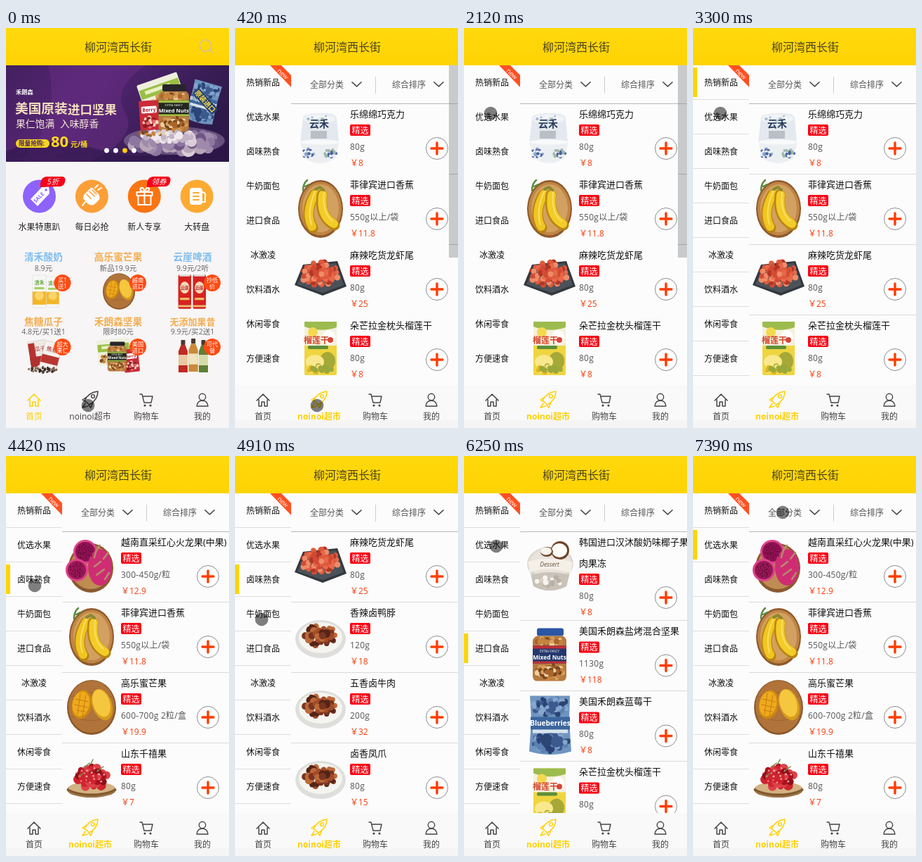
An HTML page that plays this animation: 318 px wide and 568 px high, repeating every 8 s.

```html
<!DOCTYPE html>
<html lang="zh-CN">
<head>
<meta charset="utf-8">
<title>Shop demo</title>
<style>
html, body { margin: 0; width: 100%; height: 100%; overflow: hidden; background: #fcfcfc; }
svg { display: block; width: 100vw; height: 100vh; }
text { font-family: "Open Sans", "Noto Sans CJK SC", "Noto Sans CJK", sans-serif; white-space: pre; }
</style>
</head>
<body>
<svg id="stage" viewBox="0 0 318 568" lang="zh-CN"></svg>
<script>
const LOOP = 8000;
const YELLOW = '#ffd507', RED = '#ff4a12', INK = '#222';
const BOLD = 'font-weight="700"';

// ---- drawing helpers (text is placed by its vertical centre) ----
const text = (x, y, s, size = 12, fill = INK, more = '') =>
  `<text x="${x}" y="${y + size * .38}" font-size="${size}" fill="${fill}" ${more}>${s}</text>`;
const mid = (x, y, s, size, fill, more = '') => text(x, y, s, size, fill, 'text-anchor="middle" ' + more);
const rect = (x, y, w, h, fill, r = 0, more = '') =>
  `<rect x="${x}" y="${y}" width="${w}" height="${h}" rx="${r}" fill="${fill}" ${more}/>`;
const oval = (x, y, rx, ry, fill, more = '') =>
  `<ellipse cx="${x}" cy="${y}" rx="${rx}" ry="${ry}" fill="${fill}" ${more}/>`;
const dot = (x, y, r, fill, more) => oval(x, y, r, r, fill, more);
const shape = (d, fill, more = '') => `<path d="${d}" fill="${fill}" ${more}/>`;
const line = (d, stroke, w = 1, more = '') =>
  `<path d="${d}" fill="none" stroke="${stroke}" stroke-width="${w}" stroke-linecap="round" stroke-linejoin="round" ${more}/>`;
const rule = (x1, x2, y, color) => rect(x1, y, x2 - x1, 1, color);
const at = (x, y, s, k = 1, turn = 0) =>
  `<g transform="translate(${x} ${y}) rotate(${turn}) scale(${k})">${s}</g>`;
const group = (id, s) => `<g id="${id}">${s}</g>`;

// evenly spread small pieces filling an ellipse, with some jitter
function heap(n, x, y, rx, ry, r, colors, seed = 7) {
  const rnd = () => (seed = seed * 16807 % 2147483647) / 2147483647;
  for (let i = 0; i < 3; i++) rnd();
  let s = '';
  for (let i = n - 1; i >= 0; i--) {
    const a = i * 2.4 + rnd() * .5, d = Math.sqrt((i + .5) / n);
    s += dot((x + Math.cos(a) * d * rx).toFixed(1), (y + Math.sin(a) * d * ry).toFixed(1),
      (r * (.75 + rnd() * .5)).toFixed(1), colors[Math.floor(rnd() * colors.length)]);
  }
  return s;
}
const nuts = ['#a9652c', '#ecd0a0', '#7c451d', '#d9a05c', '#c5843f'];
const berries = ['#3c5a8e', '#5c7fb2', '#2a4374', '#86a6cc'];
const plate = oval(38, 38, 32, 41, '#8f5a2b') + oval(38, 37.5, 30, 38, '#c08545') + oval(38, 37, 26, 34, '#d2a060');

// ---- product pictures, each in a 76 x 76 box ----
const bottle = (cap, body, label) => rect(32, -2, 15, 10, cap, 2) +
  shape('M32 8H47V18Q53 24 53 32V70Q53 75 48 75H31Q26 75 26 70V32Q26 24 32 18Z', body, 'stroke="#d5d9da" stroke-width=".7"') + label;
const tub = dome => shape('M-15 -6L-10 20Q0 26 10 20L15 -6Z', '#f1f1ee') +
  shape('M-15 -6Q-14 -25 0 -25T15 -6Z', dome) + oval(0, -6, 17, 4, '#dfe7e9') +
  heap(10, 0, -15, 9, 6, 2.4, ['#f0c48a', '#3f5874', '#fff', '#c9624a'], 5) +
  mid(0, 6, 'Yomia', 9, '#234466', BOLD + ' font-style="italic"') +
  heap(12, 0, 16, 8, 3, 1.8, ['#d35b41', '#6f86ab', '#e3b355'], 11);
const jar = (lid, label, stripe) => rect(20, -1, 38, 11, lid, 3) +
  shape('M20 10H57Q63 13 62 20V68Q61 74 56 74H20Q15 74 14 68V20Q13 13 20 10Z', '#b57a40') +
  heap(22, 38, 18, 20, 5, 3.2, nuts, 4) + heap(40, 38, 61, 20, 10, 3.4, nuts, 9) +
  rect(14, 24, 48, 25, label) + rect(14, 24, 48, 4, stripe) + rect(14, 46, 48, 3, stripe) +
  mid(38, 32, 'EXTRA FANCY', 4.5, '#fff') + mid(38, 40, 'Mixed Nuts', 8.4, '#fff', BOLD);
const darkJar = jar('#28252a', '#22271f', '#a3bd42');

const pics = {
  cup: shape('M13 9Q12 3 36 2T61 9L64 44H9Z', '#e3e9ef') + oval(36.5, 10, 23, 7, '#eef2f5') +
    heap(14, 36, 9, 20, 4, 2, ['#a9bbd2', '#bccab7', '#f5f7fa'], 4) + mid(36, 17, '云禾', 14, '#2a3d5e', BOLD) +
    rect(24, 27, 23, 11, '#b9bfc5') + shape('M9 42H65L59 66Q37 80 15 66Z', '#eceff2') + oval(37, 43, 28.5, 3.5, '#f8f9fa') +
    heap(16, 20, 59, 9, 6, 2.4, ['#46639e', '#8aa4cc', '#eceff2'], 3) + heap(16, 52, 59, 9, 6, 2.4, ['#46639e', '#9db7ab', '#eceff2'], 8),
  banana: plate + line('M13 12Q13 2 19 -3M16 6L22 3', '#5d8a3c', 2.5) +
    line('M29 18Q14 44 27 65', '#b98512', 15) + line('M30 17Q15 43 26 63', '#f0c521', 12) +
    line('M40 18Q36 50 58 61', '#b98512', 15) + line('M41 18Q37 48 57 59', '#f3cc28', 12) +
    line('M31 12Q18 40 25 60M43 14Q40 44 55 55', '#f9df63', 2) + line('M31 10L37 7L42 11', '#8a8a2a', 4),
  crayfish: shape('M1 46L13 17L62 12L75 48L41 61Z', '#33383f') + shape('M5 45L16 20L60 15L71 46L41 57Z', '#4b5259') +
    heap(58, 37, 30, 27, 17, 3.8, ['#d24a33', '#e8694a', '#b23524', '#f08b68', '#dd5a3d']),
  durian: rect(15, -2, 46, 76, '#efd53f', 2) + rect(15, -2, 46, 34, '#f4f1dc', 2) +
    shape('M15 -2H61V6Q38 14 15 5Z', '#9cbc4e') + oval(50, 20, 9, 10, '#fff') + dot(52, 24, 4, '#d84535') +
    dot(27, 13, 7, '#f5d850') + mid(32, 24, '榴莲干', 12, '#d5452a', BOLD) + rect(20, 32, 29, 5, '#5d8f3a', 2) +
    oval(48, 54, 11, 13, '#a6a838') + oval(30, 55, 13, 10, '#f9e98c') + heap(16, 36, 66, 19, 5, 3.4, ['#f7e078', '#e0b722', '#9aa83a'], 9),
  dragon: oval(37, 40, 32, 35, '#8a5a30') + oval(37, 39, 29, 31, '#bf8c52') +
    dot(29, 17, 17, '#dd4389') + dot(29, 17, 14, '#8f1152') + dot(17, 43, 16, '#dd4389') + dot(17, 43, 13, '#981656') +
    oval(50, 39, 17, 26, '#cf2d73') + line('M42 25Q44 14 50 8M55 27L62 18M45 50L56 42M42 38L51 31M57 56L63 47', '#b58a6e', 2.5) +
    heap(30, 29, 17, 11, 11, .7, ['#2b0b1e']) + heap(26, 17, 43, 10, 10, .7, ['#2b0b1e'], 5),
  mango: oval(38, 38, 35, 39, '#8d5829') + oval(38, 37, 33, 37, '#b0743a') + line('M8 50Q38 64 68 50M9 23Q38 10 67 23', '#9d6432', 1) +
    oval(24, 34, 14, 21, '#cc8714', 'transform="rotate(12 24 34)"') + oval(23, 33, 12, 18, '#efaa1c', 'transform="rotate(12 23 33)"') +
    line('M15 26L33 30M14 34L32 38M17 42L29 44M22 18L18 48M30 20L25 50', '#c87b10', 1) +
    oval(53, 34, 14, 23, '#d79b1d', 'transform="rotate(-18 53 34)"') + oval(52, 32, 12, 20, '#f5c73e', 'transform="rotate(-18 52 32)"'),
  tomato: oval(38, 55, 35, 11, '#9c7447') + oval(38, 52, 33, 8, '#d3b283') +
    heap(30, 38, 37, 23, 15, 5.6, ['#a9131f', '#cf2430', '#8f0e1b', '#dd4148'], 15) + heap(18, 37, 35, 22, 12, 1.3, ['#f2a3a3'], 4) +
    line('M28 23L35 17M37 18L40 12M46 29L55 22M20 36L27 31', '#6f8e45', 1.5) + line('M4 55Q38 70 72 55', '#80592f', 3),
  yogurt: at(25, 28, tub('#79bfe0')) + at(52, 52, tub('#61b8df'), 1, -14),
  carton: shape('M25 10L29 -1H52L57 10V71L53 75H28L24 71Z', '#eaf5fb') + rect(34, -5, 13, 8, '#46a5d7', 2) +
    rect(25, 10, 32, 31, '#3f91c5') + mid(41, 27, '晴牧', 14, '#fff', BOLD) +
    shape('M24 42H57V71L53 75H28L24 71Z', '#8ecce4') + shape('M24 52Q39 38 57 56V68Q38 46 24 64Z', '#f3fafc') + dot(49, 65, 4, '#4b9bc8'),
  matcha: bottle('#f2f2ee', '#f7f7f4', mid(39, 42, 'Verdi', 10, '#333', 'font-style="italic"') +
    dot(35, 60, 7, '#6f9440') + dot(44, 63, 5, '#a9c06e') + rect(27, 66, 25, 6, '#e8ecd9')),
  milk: bottle('#3e84b5', '#eef2f5', rect(27, 18, 25, 11, '#b3c8d6') + mid(39, 34, '1987', 11, '#25658f', BOLD) +
    mid(39, 48, '酸牛奶', 8, '#25658f') + rect(26, 56, 27, 14, '#71a7c8')),
  jelly: shape('M8 34L15 66Q38 78 62 66L70 34Z', '#d3cec6') + oval(39, 34, 33, 24, '#dcd7cf') + oval(39, 33, 30, 21, '#e8e3db') +
    dot(53, 15, 13, '#6d4429') + oval(52, 15, 11, 10, '#fffdf8') + oval(34, 17, 9, 7, '#6d4429') + oval(33, 16, 8, 5.5, '#f8f5ef') +
    shape('M7 31Q38 22 71 32L68 47Q38 37 10 46Z', '#f4f0e8') + mid(38, 35, 'Dessert', 8.5, '#665142', 'font-style="italic"') +
    shape('M12 50Q38 42 66 50L62 66Q38 78 15 66Z', '#c9c3ba') + heap(12, 38, 59, 20, 7, 3.2, ['#f7f4ee', '#d8d2c9', '#b9b0a4'], 4),
  jar: jar('#2b56a4', '#24386e', '#c12d35'),
  berry: shape('M10 -5H67L66 30L69 74Q39 83 9 74L12 30Z', '#6f95bf') + heap(40, 39, 10, 25, 13, 3.6, berries) +
    heap(48, 39, 61, 25, 14, 3.8, berries, 3) + rect(11, 25, 56, 18, '#3c669c') + rect(14, 43, 50, 5, '#d9e4ee') +
    mid(39, 33.5, 'Blueberries', 10, '#fff', BOLD) + dot(34, 58, 9, '#2b4577') + dot(48, 60, 8, '#3a5a8e'),
  meat: oval(38, 41, 36, 27, '#dedfdc') + oval(38, 39, 31, 22, '#f5f4ef') + heap(34, 38, 36, 23, 15, 4.6, ['#78351f', '#a34b29', '#552417', '#bd6939'], 21),
  fizz: rect(10, 0, 28, 74, '#d8221f', 4) + rect(12, 0, 24, 4, '#ddd', 2) + rect(10, 66, 28, 4, '#e5c475') +
    oval(24, 28, 10, 13, '#f2d9b5') + mid(24, 28, '云崖', 9, '#b81d22', BOLD) + rect(14, 50, 20, 5, '#e9be68'),
  box: rect(6, 2, 30, 72, '#f7f8f5', 1, 'stroke="#ddd"') + rect(6, 38, 30, 29, '#f4b629') + dot(21, 47, 10, '#fad56b') +
    mid(21, 18, '清禾', 11, '#65a440', BOLD) + rect(10, 28, 22, 5, '#a8cf63'),
  seeds: at(4, 8, rect(0, 0, 40, 60, '#efe9e3', 2, 'stroke="#ccc"') + rect(0, 4, 14, 52, '#b8322f') + rect(0, 34, 40, 20, '#b0302e') + mid(25, 18, '瓜子', 12, '#a62a2c'), 1, -9) +
    at(44, 4, rect(0, 0, 38, 60, '#f6f2ed', 2, 'stroke="#ccc"') + rect(0, 30, 38, 18, '#b93733') + mid(19, 16, '焦糖', 13, '#a62a2c'), 1, 14) +
    heap(34, 38, 68, 33, 6, 2.6, ['#2d2623', '#7e6150', '#4b3a31']),
};
const redPouch = rect(0, 0, 28, 42, '#cb2b38', 2) + rect(3, 8, 22, 10, '#fff', 2) + mid(14, 13, 'Berry', 7, '#b51f2e', BOLD) +
  heap(16, 14, 31, 11, 7, 2.6, ['#e76a72', '#f4d0bb', '#911923']);
const whitePouch = rect(0, 0, 58, 44, '#eef0dc', 2) + rect(1, 8, 56, 13, '#9abf45') + rect(8, 11, 36, 5, '#e9efc4') +
  heap(44, 30, 33, 26, 10, 3, nuts);
const smoothie = (c, label) => rect(3.5, 0, 6, 7, '#4a3a30', 1) + shape('M3.5 7H9.5L13 16V46H0V16Z', c) + rect(0, 21, 13, 15, label);

// ---- catalogue: title lines, spec, price, picture ----
const durian = ['朵芒拉金枕头榴莲干', '80g', '8', 'durian'];
const banana = ['菲律宾进口香蕉', '550g以上/袋', '11.8', 'banana'];
const lobster = ['麻辣吃货龙虾尾', '80g', '25', 'crayfish'];
const lists = {
  hot: [['乐绵绵巧克力', '80g', '8', 'cup'], banana, lobster, durian],
  fruit: [['越南直采红心火龙果(中果)', '300-450g/粒', '12.9', 'dragon'], banana,
    ['高乐蜜芒果', '600-700g 2粒/盒', '19.9', 'mango'], ['山东千禧果', '80g', '7', 'tomato']],
  deli: [lobster, ['香辣卤鸭脖', '120g', '18', 'meat'], ['五香卤牛肉', '200g', '32', 'meat'], ['卤香凤爪', '80g', '15', 'meat']],
  dairy: [['轻悦益生谷物组合风味发酵|乳', '120g', '8', 'yogurt'], ['岚湖晴牧酸奶', '80g', '8', 'carton'],
    ['净润清新抹茶酸奶', '80g', '8', 'matcha'], ['岚湖晴牧酸奶', '80g', '8', 'milk']],
  abroad: [['韩国进口汉沐酸奶味椰子果|肉果冻', '80g', '8', 'jelly'], ['美国禾朗森盐烤混合坚果', '1130g', '118', 'jar'],
    ['美国禾朗森蓝莓干', '80g', '8', 'berry'], durian],
};
function goods(items) {
  let y = 107, s = '';
  for (const [title, spec, price, pic] of items) {
    const rows = title.split('|'), b = y + (rows.length - 1) * 30;
    rows.forEach((r, i) => s += text(164, y + 15 + i * 30, r, 13, '#111'));
    s += at(84, y + 12, pics[pic]) + rect(164, b + 30, 29, 16, '#f80012', 2) + mid(178.5, b + 38, '精选', 12, '#fff') +
      text(164, b + 61, spec, 12, '#555', 'letter-spacing=".25"') + text(164, b + 84, '￥' + price, 12, '#f43c0c') +
      dot(288, b + 64, 15.5, '#fff', 'stroke="#8d8d8d"') + line(`M280 ${b + 64}h16m-8 -8v16`, '#ff3c00', 3.4);
    y += rows.length > 1 ? 126.5 : 100;
    s += `<g class="rules">${rule(80, 318, Math.floor(y), '#dadada')}</g>`;
  }
  return s;
}

// ---- tab bar ----
const icons = [
  c => line('M31 529L40 520L49 529M34 528V537H38V531H42V537H46V528', c, 1.5),
  c => line('M112 529Q118 517 131 516Q131 528 119 535ZM115 524L109 528L112 530M124 531L121 539L118 536M113 533L109 539L116 537', c, 1.5) +
    dot(124, 523, 2.4, 'none', `stroke="${c}" stroke-width="1.4"`),
  c => line('M191 520H194L197 532H207L209 523H195', c, 1.4) + dot(198, 536, 1.6, c) + dot(206, 536, 1.6, c),
  c => dot(280, 524, 4.7, 'none', `stroke="${c}" stroke-width="1.4"`) + line('M272 537Q273 529 280 529T288 537Z', c, 1.4),
];
const tabs = (on, bg) => rect(0, 507, 318, 61, bg) +
  ['首页', 'noinoi超市', '购物车', '我的'].map((s, i) => {
    const c = i == on ? '#ffd000' : '#444';
    return icons[i](c) + mid(40 + i * 80, 551, s, 12, c, i == 1 && on == 1 ? BOLD : '');
  }).join('');

// ---- home page ----
function banner() {
  const clouds = ['#8d76a0', '#b7a5b9', '#d9cdd6', '#a08aac', '#6f5585'];
  return `<g clip-path="url(#banner)">` + rect(0, 53, 318, 137, 'url(#night)') +
    shape('M60 53H200Q150 85 170 120T120 190H20Q80 130 60 53Z', '#6a2f86', 'opacity=".45"') +
    shape('M0 175Q60 150 130 172T318 165V190H0Z', '#2c1548', 'opacity=".6"') +
    oval(240, 160, 72, 20, '#9a86ab', 'opacity=".5"') +
    heap(46, 242, 162, 66, 13, 8, clouds, 12) +
    at(262, 74, pics.berry, .7, 16) + at(186, 82, whitePouch, 1.04, -19) +
    at(189, 104, redPouch, 1, -4) + at(205, 81, darkJar, .9) +
    heap(34, 232, 154, 40, 7, 4.5, ['#efe8ee', '#d9cdd6', '#c2b2c4'], 6) + heap(14, 206, 150, 20, 3, 2.4, nuts, 6) +
    at(284, 104, rect(-21, -6, 42, 12, '#27406f', 3) + mid(0, 0, '原装进口', 9.5, '#ffe14a', BOLD), 1, 48) + '</g>' +
    text(14, 91, '禾朗森', 8.2, '#fff', BOLD) + text(13, 114, '美国原装', 18.7, '#f4dfbd', BOLD) + text(88, 115, '进口坚果', 17.5, '#f4dfbd', BOLD) +
    text(14, 136, '果仁饱满', 13.8, '#f7ead6') + text(77, 136, '入味醇香', 13.8, '#f7ead6') +
    rect(14, 158, 48, 12, '#f8d51e', 6) + text(18, 164, '限量抢购:', 8.6, '#432160', BOLD) +
    text(64, 161, '80', 22, '#ffd91e', BOLD) + text(92, 165, '元/桶', 10, '#ffd91e', BOLD) +
    [0, 1, 2, 3].map(i => dot(143.5 + i * 13, 174, 3.4, i == 2 ? '#ffd000' : '#fff')).join('');
}
function home() {
  let s = rect(0, 53, 318, 515, '#f7f5f5') + banner();
  s += dot(284.5, 25, 8.3, 'none', 'stroke="#d5c39a" stroke-width="1.6"') + line('M290.5 31L295 35', '#d5c39a', 1.6);

  ['#8d63fb', '#fc9f39', '#fb7512', '#fcaa31'].forEach((c, i) => {
    const x = 47.5 + i * 74.9;
    s += dot(x, 239, 23.5, c) + mid(x, 282, ['水果特惠趴', '每日必抢', '新人专享', '大转盘'][i], 12, INK);
  });
  s += at(48, 239, shape('M-13 4L3 -13L13 -14L14 -4L-3 14Z', '#fff') + dot(9, -9, 1.8, '#8d63fb') +
      `<g transform="rotate(-46)">${mid(-2, 0, 'SALE', 7.5, '#8d63fb', BOLD)}</g>`) +
    at(122, 239, shape('M-11 -2L-2 -11Q1 -14 3 -10L10 -3Q14 3 8 8L3 12Q-3 14 -7 9L-12 3Z', '#fff') +
      line('M-7 -3L-1 3M-3 -7L4 0M1 -9L7 -3', '#fc9f39', 1.6) + line('M5 -12L9 -16M9 -9L14 -12M-9 8L-13 13', '#fff', 2)) +
    at(197.5, 239, line('M-11 -6H11V-1H-11ZM-9 -1V12H9V-1M0 -6V12M0 -6Q-9 -8 -5 -12Q-1 -13 0 -6Q2 -13 6 -12Q9 -8 0 -6', '#fff', 2)) +
    at(272, 239, rect(-10, -12, 18, 24, '#fff', 4) + line('M-5 -5H3M-5 0H3M-5 5H3', '#fcaa31', 1.8) + line('M8 -6Q14 -5 12 1V8H8', '#fff', 2));
  [[49, 36, '5折'], [201, 34, '领券']].forEach(([x, w, label]) => {
    s += shape(`M${x} 226Q${x - 1} 212 ${x + 9} 211H${x + w - 4}Q${x + w + 1} 212 ${x + w - 1} 219T${x + w - 11} 225Z`, '#f6031a') +
      mid(x + w / 2, 218.5, label, 10.5, '#fff', 'font-style="italic"');
  });

  const blue = '#7fbdef', gold = '#f4ad50';
  const cells = [
    ['清禾酸奶', '8.9元', '买1|送1', blue, at(34, 350, pics.box, .64) + at(54, 352, pics.box, .6)],
    ['高乐蜜芒果', '新品19.9元', '越南|进口', gold, at(136, 349, pics.mango, .66)],
    ['云崖啤酒', '9.9元/2听', '抄低|价', blue, at(239, 350, pics.fizz, .66) + at(260, 350, pics.fizz, .66)],
    ['焦糖瓜子', '4.8元/买1送1', '超大|果仁', gold, at(28, 441, pics.seeds, .65)],
    ['禾朗森坚果', '限时80元', '美国|进口', gold, at(129, 444, whitePouch, .8, -5) + at(166, 457, redPouch, .78, -6) + at(137, 446, darkJar, .56)],
    ['无添加果昔', '9.9元/买2送1', '可代|餐', gold,
      at(246, 443, smoothie('#c02a24', '#e8c9a0')) + at(260.5, 441, smoothie('#c98a3a', '#f0e3bd'), 1.02) + at(275, 443, smoothie('#5f7f35', '#d6dca8'))],
  ];
  cells.forEach(([name, price, tag, color, pic], i) => {
    const col = i % 3, low = i > 2, x = [53.5, 160, 266][col];
    s += mid(x, low ? 417 : 325, name, low && col == 2 ? 13 : 13.7, color, BOLD) +
      mid(x, low ? 431 : 341, price, 10.6, '#666') + pic;
    const bx = [80.5, 188, 294][col], by = low ? 453 : 362;
    s += dot(bx, by, 12, RED) + tag.split('|').map((r, k) => mid(bx, by - 4 + k * 9, r, 8.2, '#fff')).join('');
  });
  return s + tabs(0, '#f7f5f5');
}

// ---- market page ----
function market() {
  let s = rect(0, 53, 318, 515, '#fcfcfc');
  s += `<g clip-path="url(#shelf)">` +
    Object.entries(lists).map(([k, v]) => group(k, goods(v))).join('') + '</g>';
  s += text(107, 80, '全部分类', 12, '#555') + text(224, 80, '综合排序', 12, '#555') +
    line('M167 77L173.5 83L180 77M284 77L290.5 83L297 77', '#444', 1.7) +
    rect(200, 69, 1, 24, '#ccc') + rule(80, 318, 107, '#b8b8b8');
  ['热销新品', '优选水果', '卤味熟食', '牛奶面包', '进口食品', '冰激凌', '饮料酒水', '休闲零食', '方便速食'].forEach((c, i) => {
    s += mid(40, 77 + i * 49, c, 12, '#111') + `<g class="rules">${rule(0, 80, 101 + i * 49, '#dedede')}</g>`;
  });
  s += shape('M50 53H66L80 67V84Z', '#ff5021') + at(68.5, 65, mid(0, 0, 'new', 9, '#fff'), 1, 45);
  s += group('veil', rect(305, 53, 13, 273, '#c9cacb') + [107, 207, 307].map(y => rule(305, 318, y, '#a5a5a5')).join(''));
  s += group('bar', rect(0, 56, 6, 42, YELLOW));
  return s + tabs(1, '#f9f9f9') + rect(0, 557, 318, 11, '#f5f5f5');
}

const stage = document.getElementById('stage');
stage.innerHTML = `<defs>
  <clipPath id="banner"><rect y="53" width="318" height="137"/></clipPath>
  <clipPath id="shelf"><rect x="80" y="107" width="238" height="401"/></clipPath>
  <linearGradient id="night" x2="1" y2=".35"><stop stop-color="#43205f"/><stop offset=".4" stop-color="#552573"/><stop offset="1" stop-color="#2e1a4a"/></linearGradient>
  <linearGradient id="top" x2="0" y2="1"><stop stop-color="#ffd90c"/><stop offset="1" stop-color="#ffd303"/></linearGradient>
</defs>` + rect(0, 0, 318, 53, 'url(#top)') +
  group('home', home()) + group('market', market()) + mid(160, 27, '柳河湾西长街', 16, '#4a4323') +
  group('touch', dot(0, 0, 9.3, '#000', 'opacity=".5"'));

// ---- timeline: every state holds until the next one ----
const states = [
  [0, '', -1], [420, 'hot', -1], [2560, 'hot', 0], [3760, 'hot', 1], [3890, 'fruit', 1], [4420, 'fruit', 2],
  [4570, 'deli', 2], [5180, 'deli', 3], [5330, 'dairy', 3], [5730, 'dairy', 4], [5860, 'abroad', 4],
  [6550, 'abroad', 1], [6670, 'fruit', 1],
];
const touches = [
  [0, 117, 536], [980, 120, 524], [1100, 130, 480], [1220, 131, 400], [1340, 122, 310], [1460, 100, 225], [1580, 72, 150],
  [1700, 47, 84], [1820, 39, 119], [1970, 38, 120], [2120, 38, 121], [2270, 44, 82], [2420, 40, 82], [2690, 44, 114],
  [2840, 44, 122], [3300, 39, 121], [3890, 40, 140], [4010, 41, 165], [4130, 41, 182], [4420, 41, 184], [4685, 40, 200],
  [4800, 39, 220], [4910, 38, 232], [5180, 38, 255], [5330, 37, 270], [5460, 37, 275], [5860, 40, 240], [5980, 44, 190],
  [6100, 47, 144], [6250, 46, 128], [6670, 65, 122], [6820, 100, 102], [6970, 116, 91], [7120, 129, 86], [7270, 129, 82], [7390, 128, 80],
];
const held = (keys, t) => keys.findLast(k => k[0] <= t);
const el = id => document.getElementById(id);
const show = (node, on) => node.setAttribute('display', on ? 'inline' : 'none');
const rules = document.querySelectorAll('.rules');

function draw(t) {
  const [, list, row] = held(states, t), [, x, y] = held(touches, t);
  show(el('home'), !list);
  show(el('market'), list);
  for (const k in lists) show(el(k), k == list);
  show(el('veil'), row < 0);
  show(el('bar'), row >= 0);
  rules.forEach(r => show(r, row >= 0));
  el('bar').setAttribute('transform', `translate(0 ${row * 49})`);
  el('touch').setAttribute('transform', `translate(${x} ${y})`);
}
const start = performance.now();
function tick() {
  draw((performance.now() - start) % LOOP);
  requestAnimationFrame(tick);
}
draw(0);
tick();
</script>
</body>
</html>
```
